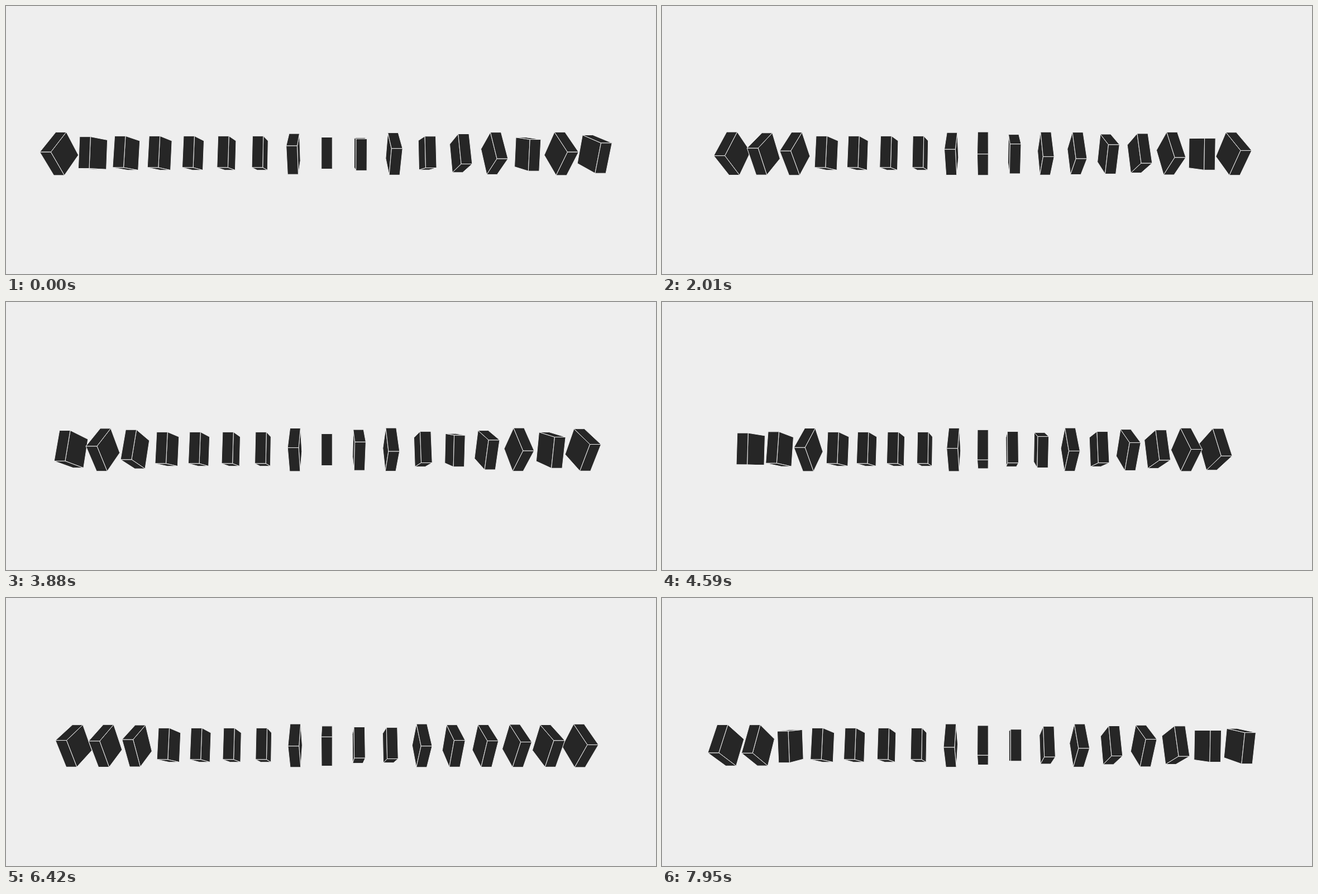
These frames come from a looping animation (1164x481 px, 8000 ms). An HTML page with a canvas:

```html
<!DOCTYPE html>
<html lang="en">
<head>
<meta charset="utf-8">
<title>Turning boxes</title>
<style>
html, body { margin: 0; width: 100%; height: 100%; overflow: hidden; background: #eee; }
canvas { display: block; }
</style>
</head>
<body>
<canvas id="stage" width="1164" height="481"></canvas>
<script>
const ctx = document.getElementById('stage').getContext('2d');
const LOOP = 8, MID = 8;
const VIEW = 750, VX = 582, VY = 265;           // perspective distance and vanishing point
const RADIUS = 38.9, HALF = 9.4, SHIFT = -7.2;  // corner radius, half thickness, row offset
const SETTLE = 3;                               // seconds for the spin to settle

// Turning points [seconds, gap between boxes] of the breathing row.
const swings = [[-1.4, 54.9], [0.1, 59.8], [1.5, 54.9], [3.18, 59.8], [5.2, 49.8], [7.2, 59.8], [8.7, 54.9]];

// Starting angle of each box in degrees; a quarter turn looks the same.
const pose = [4, -41, -38, -38, -38, -38, -38, 20, -43, 41, 13, -39, -27, -13, 39, 4, 28];

function gapAt(t) {
  const k = swings.findIndex(s => s[0] > t);
  const [t0, g0] = swings[k - 1], [t1, g1] = swings[k];
  const ease = (1 - Math.cos(Math.PI * (t - t0) / (t1 - t0))) / 2;
  return g0 + (g1 - g0) * ease;
}

// Final speed of box i and the extra speed it starts with, in degrees per second.
function spin(i) {
  if (i < 3) {
    const speed = -113 * Math.sin(Math.PI / 2 * (i + 0.3) / 2.3);
    return [speed, -1.1 * speed];
  }
  if (i < 7) return [0, 0];
  return [
    15 + 52 * Math.cos(Math.PI * (i - 10.2) / 5.3),
    -85 * Math.exp(-(((i - 12.6) / 3.2) ** 2))
  ];
}

function angleAt(i, t) {
  const [speed, extra] = spin(i);
  return pose[i] + speed * t + extra * SETTLE * (1 - Math.exp(-t / SETTLE));
}

function drawFace(points) {
  let area = 0;
  points.forEach(([x, y], n) => {
    const [nx, ny] = points[(n + 1) % 4];
    area += x * ny - nx * y;
  });
  if (area <= 0) return;
  ctx.beginPath();
  points.forEach(p => ctx.lineTo(...p));
  ctx.closePath();
  ctx.fill();
  ctx.stroke();
}

function drawBox(x, degrees) {
  const corner = (side, k) => {
    const a = (degrees + 90 * k) * Math.PI / 180;
    const scale = VIEW / (VIEW - RADIUS * Math.cos(a));
    return [VX + (x + side * HALF) * scale, VY - RADIUS * Math.sin(a) * scale];
  };
  const ring = side => [0, 1, 2, 3].map(k => corner(side, k));
  const left = ring(-1), right = ring(1);
  drawFace([...left].reverse());
  drawFace(right);
  for (let k = 0; k < 4; k++) {
    const n = (k + 1) % 4;
    drawFace([left[k], left[n], right[n], right[k]]);
  }
}

function frame(t) {
  const gap = gapAt(t);
  ctx.fillStyle = '#eee';
  ctx.fillRect(0, 0, 1164, 481);
  ctx.fillStyle = '#262626';
  ctx.strokeStyle = '#eee';
  ctx.lineWidth = 1;
  ctx.lineJoin = 'round';
  // Outer boxes first, so that nearer edges cover far ones.
  for (let d = MID; d >= 0; d--) {
    for (const i of d ? [MID - d, MID + d] : [MID]) {
      drawBox(SHIFT + (i - MID) * gap, angleAt(i, t));
    }
  }
}

let start;
function tick(now) {
  start ??= now;
  frame((now - start) / 1000 % LOOP);
  requestAnimationFrame(tick);
}
frame(0);
requestAnimationFrame(tick);
</script>
</body>
</html>
```
